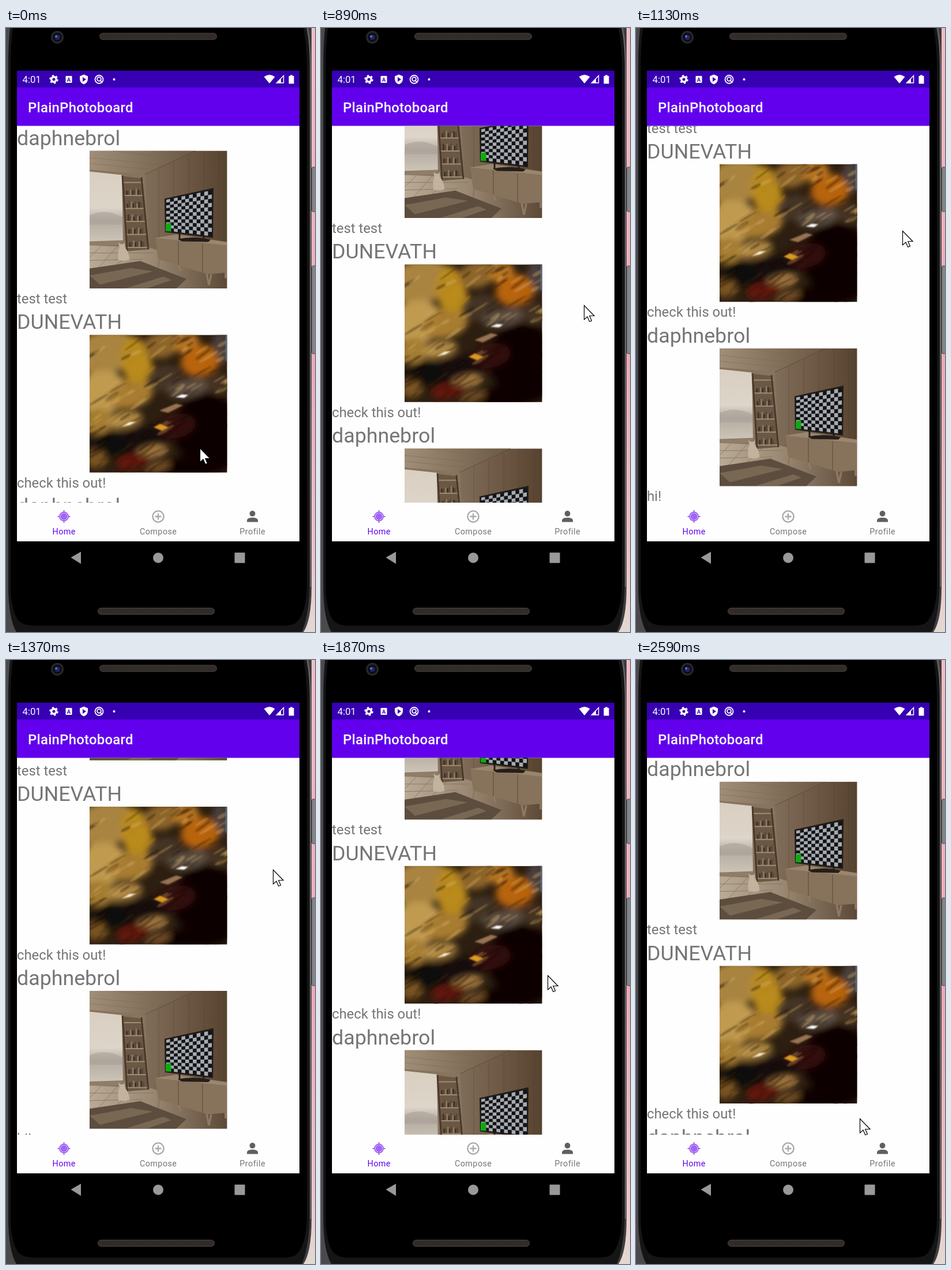
An HTML page that plays this animation: 536x1046 px, repeating every 4.4 s.

```html
<!DOCTYPE html>
<html lang="en">
<head>
<meta charset="utf-8">
<title>Photo feed scroll</title>
<style>
html,body{margin:0;width:100%;height:100%;overflow:hidden;background:#000}
svg{display:block;width:100vw;height:100vh}
text{font-family:Roboto,"Open Sans",sans-serif}
.name{font-size:35.77px;fill:#757575}
.note{font-size:23.84px;fill:#757575}
.tab{font-size:14.3px;letter-spacing:.48px;text-anchor:middle;fill:#757575}
</style>
</head>
<body>
<svg viewBox="0 0 536 1046" preserveAspectRatio="none">
<defs>
  <clipPath id="feedClip"><rect x="19" y="169.5" width="490" height="652.5"/></clipPath>
  <clipPath id="square"><rect width="238.4" height="238.4"/></clipPath>
  <filter id="soft" x="-30%" y="-30%" width="160%" height="160%"><feGaussianBlur stdDeviation="6"/></filter>
  <filter id="fine"><feGaussianBlur stdDeviation="1.1"/></filter>
  <linearGradient id="wall"><stop offset=".35" stop-color="#82705d"/><stop offset=".7" stop-color="#6d5845"/><stop offset="1" stop-color="#56432f"/></linearGradient>
  <linearGradient id="ceiling"><stop stop-color="#a08e78"/><stop offset="1" stop-color="#6a5743"/></linearGradient>
  <linearGradient id="sky" x2="0" y2="1"><stop stop-color="#d9cfc1"/><stop offset=".5" stop-color="#ddd5c9"/><stop offset=".68" stop-color="#b5aca2"/><stop offset="1" stop-color="#d0c7ba"/></linearGradient>
  <linearGradient id="floor"><stop stop-color="#b9aa96"/><stop offset=".45" stop-color="#9b8973"/><stop offset="1" stop-color="#5c4937"/></linearGradient>
  <linearGradient id="rim"><stop stop-color="#2a2a2c"/><stop offset=".5" stop-color="#77777a"/><stop offset="1" stop-color="#3c3c3e"/></linearGradient>
  <linearGradient id="backdrop" x2="0" y2="1"><stop stop-color="#f4bcc4"/><stop offset=".55" stop-color="#eca9b4"/><stop offset=".88" stop-color="#eec3c5"/><stop offset="1" stop-color="#e3d8d2"/></linearGradient>
  <pattern id="mesh" width="4" height="4" patternUnits="userSpaceOnUse"><rect width="4" height="4" fill="#2b2522"/><path d="M0 4L4 0" stroke="#47403c"/></pattern>

  <g id="room" clip-path="url(#square)">
    <rect width="239" height="239" fill="url(#wall)"/>
    <path d="M0 0H184L96 41L0 33Z" fill="url(#ceiling)"/>
    <path d="M0 12L130 25M0 22L112 33M40 0L154 14" stroke="#7a6854" stroke-width=".8" opacity=".6"/>
    <path d="M96 41L184 0" stroke="#57452f" opacity=".7"/>
    <path d="M120 32V150M146 20V80M172 8V75M198 0V70M224 0V155" stroke="#4b3929" stroke-width=".8" opacity=".4"/>
    <path d="M0 33L96 41L104 172L0 165Z" fill="#86745f"/>
    <path d="M0 36L56 42L58 161L0 161Z" fill="url(#sky)"/>
    <path d="M0 112Q28 99 57 115V128H0Z" fill="#aaa198" opacity=".6"/>
    <path d="M0 157L58 155V163L0 165Z" fill="#8e7d69"/>
    <path d="M0 164L104 168L238 205V239H0Z" fill="url(#floor)"/>
    <path d="M0 177L110 177M0 190L92 188M20 165L0 185M48 166L15 203M78 168L48 197" stroke="#81715e" stroke-width=".8"/>
    <path d="M0 204L88 191L168 222L150 239H0Z" fill="#5c4d3f"/>
    <path d="M0 216L72 203L110 209L18 232ZM60 239L128 218L142 224L98 239Z" fill="#87765f" opacity=".65"/>
    <path d="M57 44L91 48L102 171L65 174Z" fill="#6a5845"/>
    <g id="shelves"></g>
    <path d="M57 43L65 174M90 46L102 171" stroke="#4a392a" stroke-width="3"/>
    <path d="M114 151L150 145L238 158V166L118 157Z" fill="#9a866f"/>
    <path d="M114 151L238 164V211L205 214L119 188Z" fill="#87725c"/>
    <path d="M154 156V198M196 161V211" stroke="#5b4836"/>
    <path d="M121 188L119 202M154 198L158 209M203 213L207 233L211 214M236 211V221" fill="none" stroke="#8e7861" stroke-width="3.5"/>
    <path d="M153 153Q180 147 210 154L206 158L160 157Z" fill="#251e19"/>
    <path d="M156 142V154M198 147V155" stroke="#251e19" stroke-width="3"/>
    <path d="M130 83L215 64.500L214 151L131 141Z" fill="#211c19"/>
    <path d="M133 85L212 68.500V148L133 138.500Z" fill="#121315"/>
    <path id="checks" fill="#a7abb1"/>
    <path d="M132 126L141.500 125V140L132 139.500Z" fill="#0eaa12"/>
    <path d="M50 190Q48 172 52 168L50 159L54 162H58L61 159L61 168Q70 176 69 191Z" fill="#c2b39e"/>
    <path d="M65 190Q75 193 72 186" fill="none" stroke="#a39179" stroke-width="2"/>
  </g>

  <g id="blur" clip-path="url(#square)">
    <rect width="239" height="239" fill="#2c1e10"/>
    <g id="blobs" filter="url(#soft)"></g>
    <g id="streaks" filter="url(#fine)"></g>
    <g filter="url(#fine)">
      <path d="M56 159L69 151L81 150L70 156Z" fill="#fff4d8"/>
      <path d="M149 108L160 103L171 104L164 109Z" fill="#fff"/>
      <path d="M111 160L122 154L137 160L126 166Z" fill="#d99a24"/>
      <path d="M121 131L150 119L162 122L136 135Z" fill="#987352"/>
      <path d="M236 0H239V45H236Z" fill="#677386"/>
    </g>
  </g>
</defs>

<rect width="536" height="1046" fill="url(#backdrop)"/>
<path d="M0 0H530V968Q530 1025 516 1046H0Z" fill="url(#rim)"/>
<path d="M0 0H9Q4 28 4 65V960Q4 1020 18 1046H0Z" fill="#4a4a4d"/>
<path d="M7 0H521Q527 28 527 65V965Q525 1020 513 1046H18Q4 1022 4 965V65Q4 28 7 0Z" fill="#151516"/>
<path d="M12 0H516Q522 30 522 70V965Q521 1015 502 1031Q495 1035 475 1035H50Q28 1035 20 1024Q8 1005 8 965V70Q8 30 12 0Z"/>
<path d="M523 0Q528 28 528 65V968" fill="none" stroke="#6a6a6d" stroke-width="2"/>
<g fill="#858588" stroke="#444"><rect x="530.500" y="241" width="7" height="77" rx="2"/><rect x="530.500" y="412" width="7" height="152" rx="2"/></g>
<g fill="url(#mesh)" stroke="#4b4542"><rect x="162.500" y="9" width="203" height="11" rx="5.500"/><rect x="159.500" y="1004.500" width="202" height="11" rx="5.500"/></g>
<circle cx="89" cy="16" r="11" fill="#29292c"/><circle cx="89" cy="16" r="8" fill="#0d0e18"/><circle cx="89" cy="16" r="4.500" fill="#20286a"/><circle cx="87" cy="14.500" r="1.600" fill="#8794dd"/>

<rect x="19" y="103" width="490" height="67" fill="#6200ee"/>
<rect x="19" y="74" width="490" height="29" fill="#3700b3"/>
<g fill="#fff">
  <text x="28.500" y="95" font-size="16.700">4:01</text>
  <circle cx="83" cy="89" r="4.200" fill="none" stroke="#fff" stroke-width="3.400"/>
  <circle cx="83" cy="89" r="6.600" fill="none" stroke="#fff" stroke-width="2.200" stroke-dasharray="3.456"/>
  <rect x="103.500" y="83" width="11" height="12" rx="1"/>
  <text x="109" y="92.800" font-size="9.500" font-weight="700" text-anchor="middle" fill="#3700b3">A</text>
  <path d="M135 80.500L142 83.500V88Q142 95 135 97.500Q128 95 128 88V83.500Z"/>
  <path d="M133 85L139 89L133 93Z" fill="#3700b3"/>
  <g fill="none" stroke="#fff" stroke-width="1.800"><circle cx="161.500" cy="89" r="7"/><circle cx="161.500" cy="88.500" r="3.400"/><path d="M163 90L167 95"/></g>
  <circle cx="187.500" cy="89" r="2"/>
  <path d="M447.500 84.500Q457 77.500 466.500 84.500L457 96Z"/>
  <path d="M469.500 95L481.500 82.500V95Z" fill="none" stroke="#fff" stroke-width="1.500"/>
  <path d="M469 95.500L477 87.500V95.500Z"/>
  <path d="M490.500 83H493V81.500H497V83H499.500V96.500H490.500Z"/>
  <text x="38" y="146" font-size="23.840" font-weight="500" letter-spacing=".3">PlainPhotoboard</text>
</g>

<rect x="19" y="169.500" width="490" height="719.500" fill="#fefefe"/>
<g clip-path="url(#feedClip)">
  <g id="feed"></g>
  <path id="glow" fill="#6200ee"/>
</g>

<rect x="19" y="822" width="490" height="67" fill="#fefefe"/>
<g stroke="#a266f5" fill="none" stroke-width="2">
  <circle cx="100.500" cy="846" r="7.500"/><circle cx="100.500" cy="846" r="5" fill="#a266f5"/>
  <path d="M100.500 835V840M100.500 852V857M89.500 846H94M107 846H111.500"/>
</g>
<g stroke="#a9a9a9" fill="none" stroke-width="2.300"><circle cx="264" cy="846" r="9.600"/><path d="M258.500 846H269.500M264 840.500V851.500"/></g>
<g fill="#5f5f5f"><circle cx="427.500" cy="841" r="4.900"/><path d="M418 855.500V853Q418 848 427.500 848T437 853V855.500Z"/></g>
<text class="tab" x="100.700" y="877" style="fill:#6200ee">Home</text>
<text class="tab" x="264.200" y="877">Compose</text>
<text class="tab" x="427.700" y="877">Profile</text>

<g fill="#999"><path d="M112.500 917L130 907V928Z"/><circle cx="264" cy="917.500" r="9"/><rect x="396.500" y="908.500" width="18" height="18" rx="1"/></g>
<path id="cursor" d="M.5 .5V25L6 20L9.800 28.500L13.500 27L9.800 18.500H18Z" fill="#fff" stroke="#000" stroke-width="1.200"/>
</svg>
<script>
const $ = id => document.getElementById(id);
const LOOP = 4400;

// time, feed offset, cursor x, cursor y, glow depth
const poses = [
  [0, 0, 336, 727, 0],
  [770, -12, 447, 592, 0],
  [890, -122, 456, 480, 0],
  [1010, -217, 460, 405, 0],
  [1130, -295.5, 462, 351, 0],
  [1250, -284, 463, 363, 0],
  [1370, -277.3, 463, 363, 0],
  [1750, -262, 412, 455, 0],
  [1870, -174.7, 393, 546, 0],
  [1990, -65, 387, 660, 0],
  [2110, 5.3, 385, 769, 49],
  [2230, 5.3, 388, 794, 52],
  [2350, 1.5, 388, 794, 30],
  [2470, -.7, 388, 794, 11],
  [2590, -1.7, 388, 794, 0]
];

function random(seed) {
  return () => (seed = (seed * 16807) % 2147483647) / 2147483647;
}

function drawChecks() {
  const cols = 12, rows = 11;
  const at = (c, r) => {
    const u = c / cols, top = 85 - 16.5 * u, bottom = 138.5 + 9.5 * u;
    return (133 + 79 * u).toFixed(1) + ' ' + (top + (bottom - top) * r / rows).toFixed(1);
  };
  let d = '';
  for (let r = 0; r < rows; r++)
    for (let c = r % 2; c < cols; c += 2)
      d += `M${at(c, r)}L${at(c + 1, r)}L${at(c + 1, r + 1)}L${at(c, r + 1)}Z`;
  $('checks').setAttribute('d', d);
}

function drawShelves() {
  const rnd = random(31);
  let out = '';
  for (let i = 0; i < 6; i++) {
    const y = 55 + i * 22.5, x = 59 + i * 1.3;
    for (let b = 0; i && b < 8; b++) {
      const h = 8 + rnd() * 5;
      out += `<rect x="${x + 3 + b * 3.3}" y="${y - h}" width="2.6" height="${h}" fill="${['#3d3026', '#574637', '#8b7860'][b * 7 % 3]}"/>`;
    }
    out += `<path d="M${x} ${y}H${x + 35}" stroke="#a08c73" stroke-width="2"/>`;
  }
  $('shelves').innerHTML = out;
}

function drawBlur() {
  const blobs = [
    [28, 30, 55, 38, '#a9843f'], [82, 50, 26, 48, '#b98a1c'], [22, 100, 45, 38, '#c09a50'],
    [70, 105, 40, 22, '#a87d33'], [125, 18, 32, 22, '#8d652b'], [168, 14, 22, 18, '#b87522'],
    [192, 45, 34, 27, '#b8640f'], [228, 22, 12, 28, '#4b4340'], [130, 75, 32, 22, '#443427'],
    [172, 92, 38, 15, '#5d5044'], [225, 85, 22, 18, '#453221'], [15, 150, 26, 22, '#a47b31'],
    [60, 148, 32, 14, '#ae8742'], [205, 165, 60, 62, '#080605'], [95, 185, 45, 26, '#160d08'],
    [35, 190, 30, 22, '#100a07'], [150, 158, 34, 20, '#30100a'], [190, 225, 65, 22, '#070504'],
    [107, 203, 28, 11, '#9d7440'], [75, 220, 28, 13, '#65150c'], [12, 215, 18, 16, '#785322'],
    [120, 228, 22, 8, '#6e4c25']
  ];
  const ellipse = (x, y, rx, ry, fill, turn, alpha) =>
    `<ellipse rx="${rx}" ry="${ry}" fill="${fill}" opacity="${alpha}" transform="translate(${x} ${y}) rotate(${turn})"/>`;
  $('blobs').innerHTML = blobs.map(([x, y, rx, ry, c]) => ellipse(x, y, rx, ry, c, -12, 1)).join('');

  const rnd = random(77);
  let out = '';
  for (let i = 0; i < 170; i++) {
    const [x, y, rx, ry, c] = blobs[i % blobs.length];
    const px = x + (rnd() - .5) * rx * 1.5, py = y + (rnd() - .5) * ry * 1.5;
    const dark = px > 150 && py > 110;
    const tint = dark ? '#17100c' : [c, '#2b1b0c', '#d3ad63'][Math.floor(rnd() * (py > 165 ? 2 : 3))];
    out += ellipse(px, py, 7 + rnd() * 13, 1 + rnd() * 2.4, tint, -25 - rnd() * 15, .38);
  }
  $('streaks').innerHTML = out;
}

function drawFeed() {
  const posts = [
    ['daphnebrol', 'room', 'test test'],
    ['DUNEVATH', 'blur', 'check this out!'],
    ['daphnebrol', 'room', 'hi!']
  ];
  $('feed').innerHTML = posts.map(([name, photo, note], i) => {
    const y = 212.5 + i * 318.9;
    return `<text class="name" x="19" y="${y - 10}">${name}</text>` +
      `<use href="#${photo}" x="145" y="${y}"/>` +
      `<text class="note" x="19" y="${y + 264.5}">${note}</text>`;
  }).join('');
}

function glowPath(depth) {
  if (!depth) return '';
  const half = 310, r = (half * half + depth * depth) / (2 * depth);
  return `M${340 - half} 169.500A${r} ${r} 0 0 0 ${340 + half} 169.500Z`;
}

function render(t) {
  const [, scroll, x, y, depth] = poses.findLast(p => p[0] <= t);
  $('feed').setAttribute('transform', `translate(0 ${scroll})`);
  $('cursor').setAttribute('transform', `translate(${x} ${y})`);
  $('glow').setAttribute('d', glowPath(depth));
  $('glow').setAttribute('opacity', Math.min(.09, depth / 500));
}

drawChecks();
drawShelves();
drawBlur();
drawFeed();
const start = performance.now();
function tick() {
  render((performance.now() - start) % LOOP);
  requestAnimationFrame(tick);
}
tick();
</script>
</body>
</html>
```
